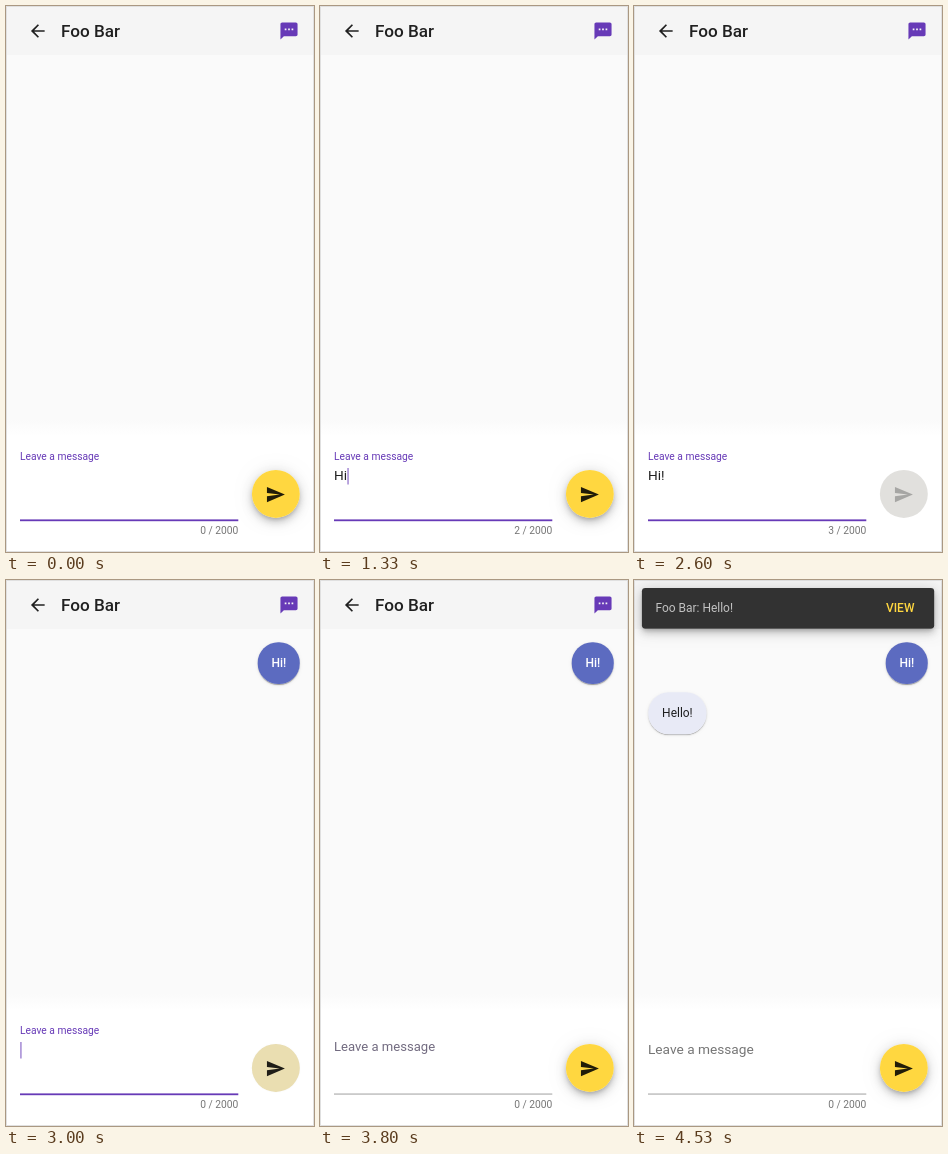
Recreate the animation shown at these times as an HTML page with a canvas. Size 308x546 px, loop 4990 ms.

```html
<!DOCTYPE html>
<html lang="en">
<head>
<meta charset="utf-8">
<title>Chat</title>
<style>
html, body { margin: 0; width: 100%; height: 100%; overflow: hidden; background: #fff; }
canvas { display: block; width: 308px; height: 546px; }
</style>
</head>
<body>
<canvas id="stage"></canvas>
<script>
const W = 308, H = 546, LOOP = 4990, TICK = 200 / 3;
const S = W / 360; // the layout is 360 units wide
const canvas = document.getElementById('stage');
const ctx = canvas.getContext('2d');
const dpr = window.devicePixelRatio || 1;
canvas.width = Math.round(W * dpr);
canvas.height = Math.round(H * dpr);

const PURPLE = [103, 58, 183, 1];
const YELLOW = [255, 215, 64, 1];
const HINT = [0, 0, 0, 0.54];
const DISABLED = [0, 0, 0, 0.12];

// Shadows: offset y, blur, spread, alpha
const LOW = [[2, 1, -1, 0.2], [1, 1, 0, 0.14], [1, 3, 0, 0.12]];
const HIGH = [[3, 5, -1, 0.2], [6, 10, 0, 0.14], [1, 18, 0, 0.12]];

const ICONS = {
  back: new Path2D('M20 11H7.83l5.59-5.59L12 4l-8 8 8 8 1.41-1.41L7.83 13H20v-2z'),
  chat: new Path2D('M20 2H4c-1.1 0-1.99.9-1.99 2L2 22l4-4h14c1.1 0 2-.9 2-2V4c0-1.1-.9-2-2-2zM9 11H7V9h2v2zm4 0h-2V9h2v2zm4 0h-2V9h2v2z'),
  send: new Path2D('M2.01 21L23 12 2.01 3 2 10l15 2-15 2z')
};

const clamp = v => Math.min(1, Math.max(0, v));
const lerp = (a, b, p) => a + (b - a) * p;
const rgba = c => `rgba(${c.join(',')})`;

function bezier(x1, y1, x2, y2) {
  const at = (a, b, u) => 3 * (1 - u) * (1 - u) * u * a + 3 * (1 - u) * u * u * b + u * u * u;
  return x => {
    if (x <= 0 || x >= 1) return clamp(x);
    let lo = 0, hi = 1;
    for (let i = 0; i < 30; i++) {
      const mid = (lo + hi) / 2;
      if (at(x1, x2, mid) < x) lo = mid; else hi = mid;
    }
    return at(y1, y2, lo);
  };
}
const swift = bezier(0.25, 0.8, 0.25, 1);
const standard = bezier(0.4, 0, 0.2, 1);

// Blends colours with premultiplied alpha
function mix(a, b, p) {
  const alpha = lerp(a[3], b[3], p);
  const rgb = [0, 1, 2].map(i => Math.round(lerp(a[i] * a[3], b[i] * b[3], p) / alpha));
  return [...rgb, alpha];
}

function text(str, x, y, size, color, weight = 400, align = 'left') {
  ctx.font = `${weight} ${size * S}px Roboto, sans-serif`;
  ctx.textAlign = align;
  ctx.fillStyle = color;
  ctx.fillText(str, x, y);
}

function rect(x, y, w, h, color) {
  ctx.fillStyle = color;
  ctx.fillRect(x, y, w, h);
}

function icon(name, cx, cy, color) {
  ctx.save();
  ctx.translate(cx, cy);
  ctx.scale(S, S);
  ctx.translate(-12, -12);
  ctx.fillStyle = color;
  ctx.fill(ICONS[name]);
  ctx.restore();
}

function card(x, y, w, h, r, color, shadows, k = 1) {
  ctx.save();
  ctx.beginPath();
  ctx.rect(-100, -100, W + 200, H + 200);
  ctx.roundRect(x, y, w, h, r);
  ctx.clip('evenodd');
  for (const [dy, blur, spread, alpha] of k > 0 ? shadows : []) {
    const g = spread * S * k;
    ctx.shadowColor = `rgba(0,0,0,${alpha * k})`;
    ctx.shadowBlur = blur * S * k * dpr;
    ctx.shadowOffsetX = 1000 * dpr;
    ctx.shadowOffsetY = dy * S * k * dpr;
    ctx.fillStyle = '#000';
    ctx.beginPath();
    ctx.roundRect(x - 1000 - g, y - g, w + 2 * g, h + 2 * g, Math.max(0, r + g));
    ctx.fill();
  }
  ctx.restore();
  ctx.fillStyle = color;
  ctx.beginPath();
  ctx.roundRect(x, y, w, h, r);
  ctx.fill();
}

function page() {
  rect(0, 0, W, H, '#fff');
  rect(0, 49, W, 381, '#fafafa');
  const fade = ctx.createLinearGradient(0, 414, 0, 430);
  fade.addColorStop(0, '#fafafa');
  fade.addColorStop(1, '#fff');
  rect(0, 414, W, 16, fade);
  rect(0, 0, W, 49, '#f5f5f5');
  icon('back', 31.8, 25, 'rgba(0,0,0,.87)');
  text('Foo Bar', 55, 31, 20, 'rgba(0,0,0,.87)', 500);
  icon('chat', 283, 25, rgba(PURPLE));
  ctx.strokeStyle = '#e0e0e0';
  ctx.lineWidth = 1;
  ctx.strokeRect(0.5, 0.5, W - 1, H - 1);
}

function field(t) {
  const typed = t < 990 || t >= 2930 ? '' : t < 1330 ? 'H' : t < 1930 ? 'Hi' : 'Hi!';
  const focused = t < 3660;
  const p = swift(clamp((t - 3667) / 400));
  text('Leave a message', 14, lerp(454.1, 474.3, p), lerp(12, 16, p), rgba(mix(PURPLE, HINT, p)));
  text(typed, 14, 474.3, 16, 'rgba(0,0,0,.87)');

  const blink = [[330, 795], [995, 1860], [1930, 2460], [2930, 3460]];
  if (blink.some(([on, off]) => t >= on && t < off)) {
    const w = typed ? ctx.measureText(typed).width : 0;
    rect(14.5 + w, 462, 0.9, 16.5, rgba(PURPLE));
  }
  if (focused) rect(14, 513.4, 218.3, 1.8, rgba(PURPLE));
  else rect(14, 513.6, 218.3, 0.9, 'rgba(0,0,0,.42)');
  text(`${typed.length} / 2000`, 232.3, 528.4, 12, rgba(HINT), 400, 'right');
}

function sendButton(t) {
  const off = t >= 2330 && t < 2930;
  let color = YELLOW, lift = 1;
  if (off) {
    color = mix(YELLOW, DISABLED, swift(clamp((t - 2333.4) / 400)));
    lift = 1 - standard(clamp((t - 2333.4) / 280));
  } else if (t >= 2930) {
    color = mix(DISABLED, YELLOW, swift(clamp((t - 2964) / 400)));
    lift = standard(clamp((t - 2964) / 280));
  }
  card(245.9, 464, 47.9, 47.9, 23.95, rgba(color), HIGH, lift);
  icon('send', 269.5, 488.6, off ? 'rgba(0,0,0,.26)' : 'rgba(0,0,0,.87)');
}

function bubbles(t) {
  if (t >= 2930) {
    card(251.7, 62.2, 42.1, 41.9, 20.5, '#5c6bc0', LOW);
    text('Hi!', 272.8, 87.2, 14, '#fff', 500, 'center');
  }
  if (t >= 4330) {
    card(14.3, 112.3, 58.2, 41.9, 20.5, '#e8eaf6', LOW);
    text('Hello!', 43.4, 137.3, 14, 'rgba(0,0,0,.87)', 400, 'center');
  }
}

function snackbar(t) {
  if (t < 4460) return;
  const p = t < 4530 ? 0.88 : 1;
  const scale = lerp(0.8, 1, p);
  ctx.save();
  ctx.globalAlpha = p;
  ctx.translate(154, 28.3);
  ctx.scale(scale, scale);
  ctx.translate(-154, -28.3);
  card(7.9, 7.9, 292.3, 40.8, 3.4, '#323232', HIGH);
  text('Foo Bar: Hello!', 21.4, 32, 14, 'rgba(255,255,255,.7)');
  text('VIEW', 266.2, 32, 14, rgba(YELLOW), 500, 'center');
  ctx.restore();
}

function draw(now) {
  // The picture advances 15 times a second
  const ms = now % LOOP;
  const t = Math.floor((Math.floor(ms / 10) * 10 + 5) / TICK) * TICK;
  ctx.setTransform(dpr, 0, 0, dpr, 0, 0);
  page();
  bubbles(t);
  field(t);
  sendButton(t);
  snackbar(t);
}

let start = null;
function loop(now) {
  if (start === null) start = now;
  draw(now - start);
  requestAnimationFrame(loop);
}
draw(0);
requestAnimationFrame(loop);
</script>
</body>
</html>
```
